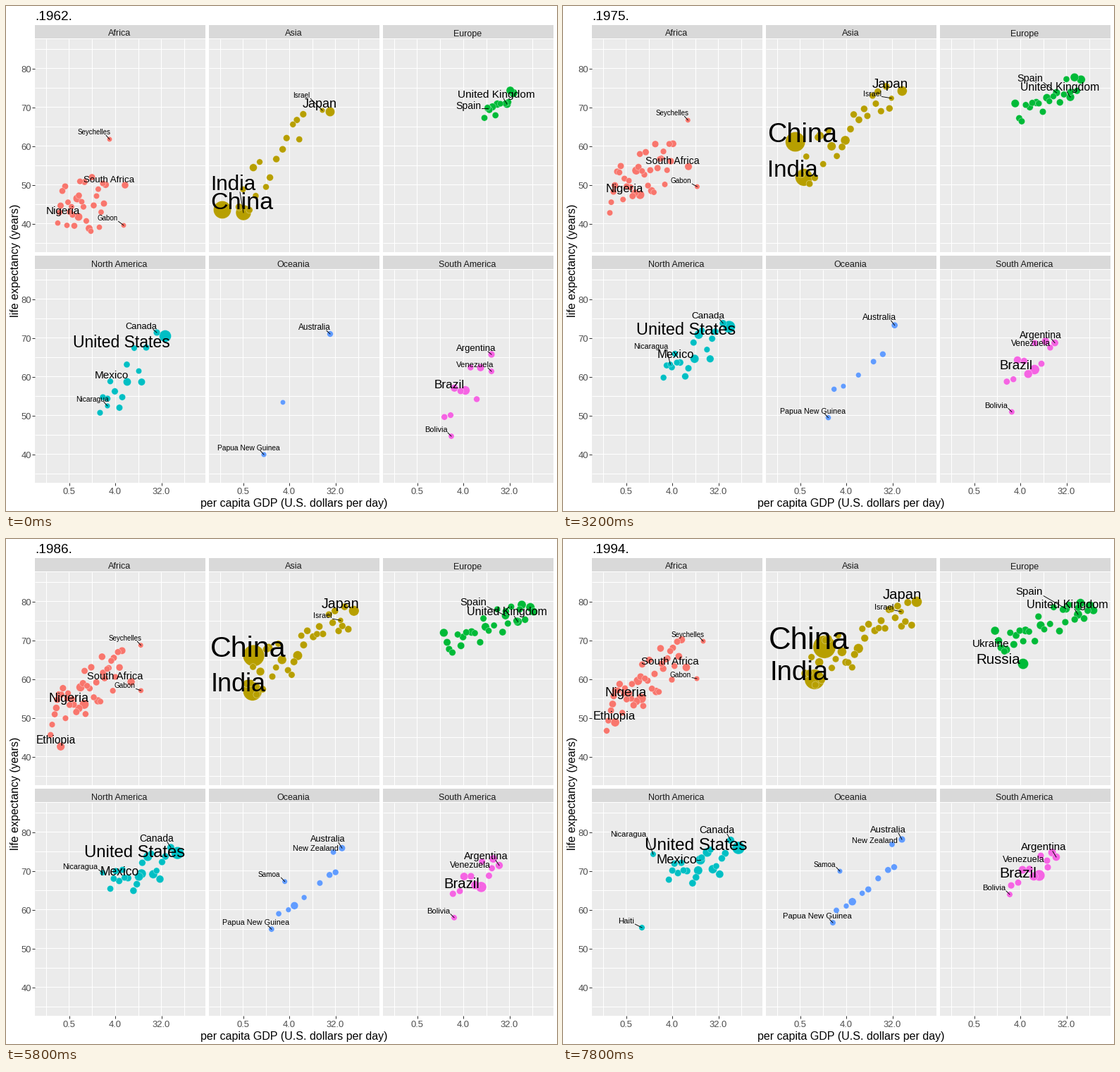
A matplotlib script that plays this animation: 782x716 px, repeating every 8 s.

```python
import numpy as np
import matplotlib.pyplot as plt
from matplotlib.animation import FuncAnimation
from matplotlib.patches import Rectangle

W, H, DPI = 782, 716, 64
FRAMES, STEP = 40, 200
LAST = FRAMES - 1
PT = 72 / DPI  # points per pixel

plt.rcParams["font.family"] = "Liberation Sans"
fig = plt.figure(figsize=(W / DPI, H / DPI), dpi=DPI, facecolor="white")
ax = fig.add_axes([0, 0, 1, 1])
ax.set_xlim(0, W)
ax.set_ylim(H, 0)
ax.axis("off")

rng = np.random.default_rng(4)
time = np.arange(FRAMES)

PANELS = {
    "Africa": (41, 27, "#F8766D"),
    "Asia": (288, 27, "#B79F00"),
    "Europe": (535, 27, "#00BA38"),
    "North America": (41, 354, "#00BFC4"),
    "Oceania": (288, 354, "#619CFF"),
    "South America": (535, 354, "#F564E3"),
}


def rect(x, y, w, h, color):
    ax.add_patch(Rectangle((x, y), w, h, fc=color, lw=0, zorder=0))


def write(x, y, s, px, color="black", ha="center", **kw):
    """Place text so that its capitals are centred on y."""
    return ax.text(x, y + 0.36 * px, s, size=px * PT, color=color, ha=ha,
                   va="baseline", **kw)


def line(xs, ys, color):
    ax.plot(xs, ys, color=color, lw=PT, zorder=1, solid_capstyle="butt")


def draw_panel(name, left, top):
    rect(left, top, 242, 19, "#D9D9D9")
    rect(left, top + 20, 242, 302, "#EBEBEB")
    write(left + 120, top + 11, name, 12.5, "#1A1A1A")
    for i in range(7):
        x = left + 15.5 + 32.75 * i
        line([x, x], [top + 20, top + 322], "white")
    for i in range(11):
        y = top + 33.5 + 27.55 * i
        line([left, left + 242], [y, y], "white")
    if top > 27:
        for i, s in enumerate(("0.5", "4.0", "32.0")):
            x = left + 48.5 + 65.5 * i
            line([x, x], [676, 680], "#333333")
            write(x, 687.5, s, 13, "#4D4D4D")
    if left == 41:
        for i in range(5):
            y = top + 61.5 + 55.1 * i
            line([37, 41], [y, y], "#333333")
            write(36, y + 0.5, str(80 - 10 * i), 13, "#4D4D4D", "right")


for name, (left, top, _) in PANELS.items():
    draw_panel(name, left, top)
write(408.5, 704, "per capita GDP (U.S. dollars per day)", 16)
ax.text(18.5, 361, "life expectancy (years)", size=16 * PT, rotation=90,
        rotation_mode="anchor", ha="center", va="baseline")
title = write(41, 13.5, "", 19, ha="left")

dots, labels = [], []


def add_dot(panel, start, x, y, r):
    dots.append((np.where(time < start, np.nan, x), y, r, PANELS[panel][2]))


def crowd(panel, count, begin, end, size=4):
    """Unnamed dots around a sloping trend that drifts and tilts.

    begin and end hold: centre x, centre y, half width, slope, scatter.
    """
    n0, n1 = count
    ease = 1 - (1 - time / LAST) ** 1.5
    cx, cy, half, slope, spread = (a + (b - a) * ease
                                   for a, b in zip(begin, end))
    for i in range(n1):
        u = 2 * ((0.25 + 0.618034 * i) % 1) - 1
        v = np.clip(rng.normal(), -1.7, 1.7)
        start = 0 if i < n0 else 2 + 32 * (i - n0) / (n1 - n0)
        r = size + min(rng.exponential(0.45), 2)
        add_dot(panel, start, cx + half * u, cy + slope * half * u + spread * v,
                r * (1 + 0.08 * time / LAST))


def track(panel, name, font, path, nudge=(-22, -10), nudge_end=None, start=0):
    """A named dot on evenly timed path points, label nudged off the dot."""
    keys = np.linspace(start, LAST, len(path))
    x, y = (np.interp(time, keys, c) for c in np.transpose(path))
    size, ox, oy = (np.interp(time, [start, LAST], pair)
                    for pair in zip((font[0], *nudge),
                                    (font[1], *(nudge_end or nudge))))
    add_dot(panel, start, x, y, size / 2.7)
    art = write(0, 0, name, 100, zorder=5)
    half = art.get_window_extent().width / 200 * size
    link, = ax.plot([], [], color="black", lw=0.9 * PT, zorder=4)
    left = PANELS[panel][0]
    tx = np.clip(x + ox, left + 2 + half, left + 240 - half)
    labels.append((panel, art, link, start, x, y, tx, y + oy, size, half))


crowd("Africa", (29, 40), (106, 286, 36, -0.4, 23), (114, 206, 55, -0.9, 18))
crowd("Asia", (15, 32), (376, 227, 50, -1.3, 18), (416, 148, 80, -0.6, 18), 4.3)
crowd("Europe", (11, 28), (698, 139, 24, -0.7, 8), (680, 122, 74, -0.4, 11), 4.2)
crowd("North America", (12, 18), (166, 530, 36, -1.1, 20),
      (190, 464, 44, -0.3, 13))
crowd("Oceania", (1, 8), (414, 538, 42, -0.4, 12), (426, 493, 48, -0.6, 10), 3.6)
crowd("South America", (7, 8), (646, 528, 30, -0.3, 28),
      (663, 460, 34, -0.4, 12), 4.3)

# Bigger names first: later ones give way to them.
track("Asia", "China", (34, 43.7),
      [(307, 289), (317, 213), (326, 200), (334, 184), (346, 170), (358, 160),
       (371, 153)], (-22, -13))
track("Asia", "India", (29.5, 38.4), [(337, 293), (343, 232), (357, 199)],
      (-22, -13))
track("North America", "United States", (23, 24.2),
      [(226, 468), (238, 452), (249, 438)], (-62, 8), (-60, -6))
track("Europe", "Russia", (20.5, 20.5), [(666, 147), (653, 177)],
      (0, -12), (-35, -7), 34)
track("Asia", "Japan", (18, 20.2), [(460, 150), (486, 114), (502, 89)],
      (-15, -12), (-21, -11))
track("South America", "Brazil", (17.2, 21.3),
      [(652, 545), (673, 509), (676, 477)], (-23, -9), (-30, -5))
track("North America", "Mexico", (15.2, 18.3),
      [(172, 533), (190, 493), (195, 455)], (-22, -10), (-34, -2))
track("Africa", "Nigeria", (15.3, 18.7),
      [(103, 299), (109, 277), (111, 237), (111, 226)])
track("Europe", "United Kingdom", (15.4, 16.3),
      [(711, 139), (722, 127), (731, 107)], (-15, -15))
track("Europe", "Ukraine", (15.3, 15.3), [(647, 145), (629, 157)],
      (-43, -10), (-22, -10), 34)
track("Africa", "Ethiopia", (15, 16.5), [(79, 303), (77, 290), (74, 260)],
      start=24)
track("Europe", "Spain", (14, 15), [(684, 145), (704, 118), (714, 99)],
      (-28, -4), (-52, -25))
track("Africa", "South Africa", (13.4, 15.1),
      [(169, 254), (180, 222), (175, 182)], (-23, -9))
track("South America", "Argentina", (13.1, 15),
      [(689, 494), (700, 474), (700, 451)], (-22, -10), (-18, -15))
track("North America", "Canada", (12.9, 14.2),
      [(214, 463), (230, 447), (238, 427)], (-22, -10), (-20, -15))
track("Oceania", "Australia", (11.8, 13), [(460, 465), (473, 450), (481, 426)],
      (-22, -10), (-20, -15))
track("South America", "Venezuela", (11.4, 12.8),
      [(689, 518), (692, 477), (687, 456)], (-23, -10), (-33, -3))
track("North America", "Haiti", (11.4, 11.4), [(122, 557), (112, 551)],
      start=33)
track("South America", "Bolivia", (11, 11.3),
      [(632, 610), (638, 568), (634, 504)])
track("Oceania", "New Zealand", (10.9, 11), [(462, 456), (467, 433)],
      (-25, -6), start=18)
track("North America", "Nicaragua", (10.3, 11.1),
      [(144, 567), (156, 516), (140, 481), (128, 447)], (-22, -10), (-35, -9))
track("Oceania", "Papua New Guinea", (10.2, 11.2),
      [(366, 636), (377, 592), (375, 556), (383, 544)])
track("Asia", "Israel", (10, 11.1), [(449, 148), (470, 127), (480, 103)],
      (-30, -7), (-24, -7))
track("Oceania", "Samoa", (10, 10), [(397, 493), (393, 471)], start=24)
track("Africa", "Seychelles", (9.7, 9.8), [(147, 189), (184, 156), (199, 145)])
track("Africa", "Gabon", (9.7, 10.1),
      [(167, 311), (190, 267), (192, 220), (190, 198)], (-23, -10), (-23, -6))

dots.sort(key=lambda d: -d[2][-1])  # small dots lie on top
px, py, pr = (np.array([d[i] for d in dots]) for i in range(3))
cloud = ax.scatter(px[:, 0], py[:, 0], c=[d[3] for d in dots],
                   edgecolors="#FFFFFF99", linewidths=0.5 * PT, zorder=3)


def make_room(x, y, size, half, placed):
    """Lift a label that would cover one already placed."""
    for ox, oy, osize, ohalf in placed:
        gap = 0.4 * (size + osize)
        if abs(x - ox) < half + ohalf and abs(y - oy) < gap:
            y = oy - gap
    return y


def update(n):
    title.set_text(f".{round(1962 + 0.825 * n)}.")
    cloud.set_offsets(np.column_stack((px[:, n], py[:, n])))
    cloud.set_sizes((2 * pr[:, n] * PT) ** 2)
    placed = {panel: [] for panel in PANELS}
    for panel, art, link, start, *curves in labels:
        art.set_visible(n >= start)
        link.set_visible(False)
        if n < start:
            continue
        dx, dy, x, y, size, half = (c[n] for c in curves)
        y = make_room(x, y, size, half, placed[panel])
        placed[panel].append((x, y, size, half))
        art.set_position((x, y + 0.36 * size))
        art.set_fontsize(size * PT)
        # a leader joins the text to its dot when they stand apart
        ex = np.clip(dx - 5, x - half, x + half + 1)
        ey = np.clip(dy, y - 0.45 * size, y + 0.45 * size)
        if max(abs(dy - ey), dx - x - half) > 4:
            link.set_visible(True)
            link.set_data([ex, dx], [ey, dy])
    return []


anim = FuncAnimation(fig, update, frames=FRAMES, interval=STEP,
                     init_func=lambda: update(0), repeat=True, repeat_delay=0)
plt.show()
```
